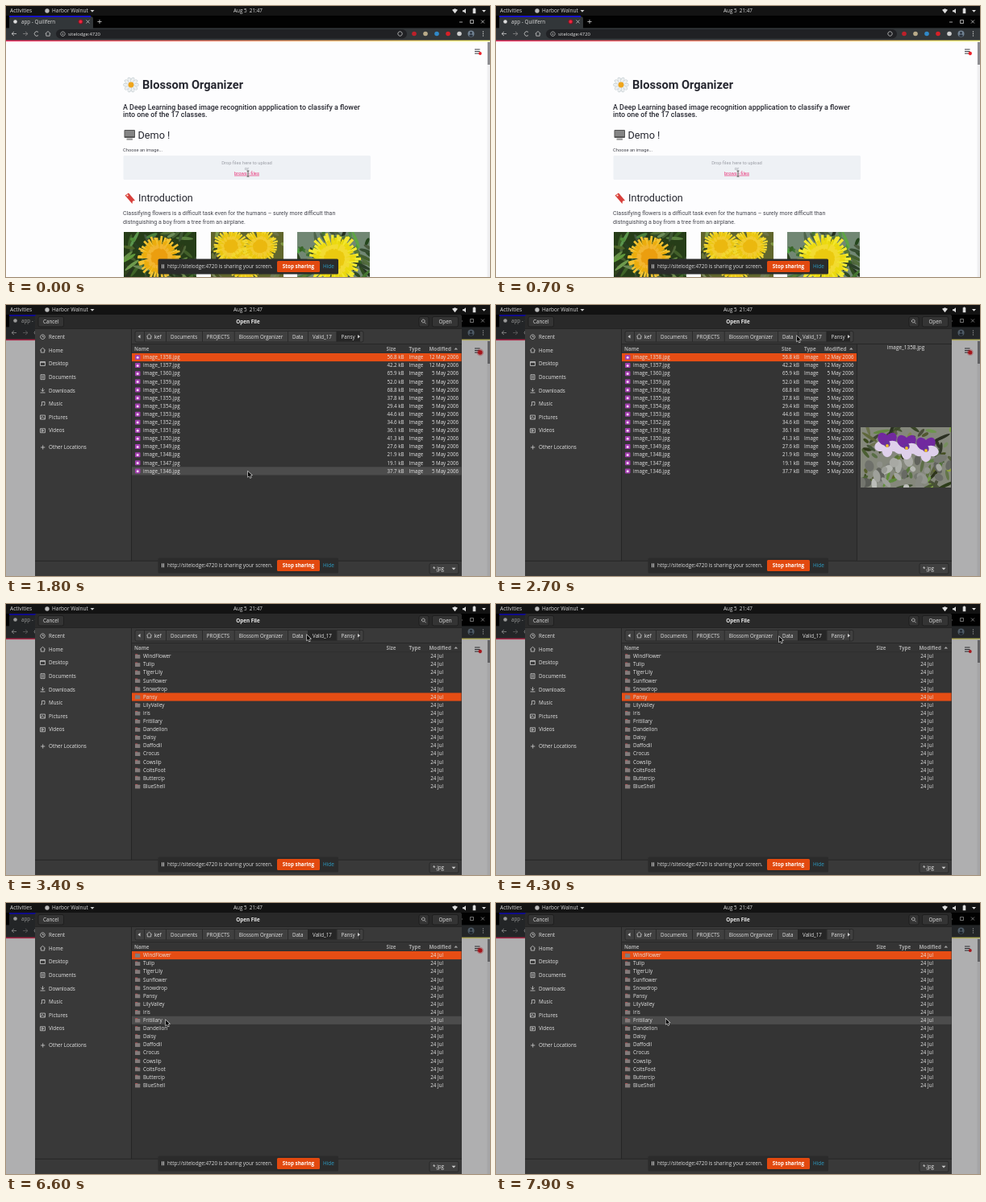
Write an HTML page with a canvas that moves like this. It is 600 by 337 pixels and loops after 8 s.

```html
<!DOCTYPE html>
<html lang="en">
<head>
<meta charset="utf-8">
<title>Flower demo</title>
<style>
html, body { margin: 0; width: 100%; height: 100%; overflow: hidden; background: #000; }
canvas { display: block; }
</style>
</head>
<body>
<canvas id="stage" width="600" height="337"></canvas>
<script>
const g = document.getElementById('stage').getContext('2d');
const LOOP = 8000, STEP = 100, TAU = Math.PI * 2;
const UI = '"Open Sans", sans-serif', PAGE = 'Roboto, sans-serif';
const ADDRESS = 'sitelodge:4720';
const INK = '#e4e4e4', PANEL = '#393939', LIST = '#343434', EDGE = '#222', ORANGE = '#e64d14';

// ---------- helpers ----------
function rect(x, y, w, h, fill) { g.fillStyle = fill; g.fillRect(x, y, w, h); }

function box(x, y, w, h, r, fill, stroke) {
  g.beginPath();
  g.roundRect(x, y, w, h, r);
  g.fillStyle = fill;
  g.fill();
  if (stroke) { g.strokeStyle = stroke; g.lineWidth = 0.7; g.stroke(); }
}

function oval(x, y, rx, ry, tilt, fill) {
  g.beginPath();
  g.ellipse(x, y, rx, ry, tilt, 0, TAU);
  g.fillStyle = fill;
  g.fill();
}
const dot = (x, y, r, fill) => oval(x, y, r, r, 0, fill);

// y is the middle of the capitals
function text(s, x, y, color = INK, size = 6.3, weight = 500, align = 'left', font = UI) {
  g.font = `${weight} ${size}px ${font}`;
  g.textAlign = align;
  g.fillStyle = color;
  g.fillText(s, x, y + size * 0.355);
}
const pageText = (s, x, y, size, color = '#44454d', weight = 400, align = 'left') =>
  text(s, x, y, color, size, weight, align, PAGE);

// Icon paths are centred on 0,0
const ICONS = {
  back: 'M3 0H-3M0-2.5L-3 0L0 2.5',
  forward: 'M-3 0H3M0-2.5L3 0L0 2.5',
  reload: 'M2 2A2.8 2.8 0 1 1 2 -2',
  house: 'M-3.3 0L0-3L3.3 0M-2.2-.6V2.7H2.2V-.6',
  cross: 'M-2-2L2 2M2-2L-2 2',
  plus: 'M-2.6 0H2.6M0-2.6V2.6',
  minus: 'M-2 .5H2',
  square: 'M-2-2H2V2H-2Z',
  ring: 'M2.7 0A2.7 2.7 0 1 1 2.7 -.01',
  clock: 'M2.8 0A2.8 2.8 0 1 1 2.8 -.01M0-1.5V0H1.5',
  screen: 'M-3-2.5H3V2.5H-3ZM-3-1.6H3',
  sheet: 'M-2.5-3H2.5V3H-2.5ZM-1.5-1H1.5M-1.5 1H1.5',
  load: 'M0-3V1M-2-1L0 1L2-1M-3 2.7H3',
  note: 'M-1 2V-2.5H2.5V1.5M-2.5 2H-1M1 1.5H2.5',
  picture: 'M-3-2.5H3V2.5H-3ZM-2.5 2L-.5-1L2.5 2',
  film: 'M-3-2.5H3V2.5H-3ZM-1-1.4L1.5 0L-1 1.4Z',
  lens: 'M1.4-.5A1.9 1.9 0 1 1 1.4-.51M1 1L2.8 2.8',
  beam: 'M-1.5-3.5H1.5M0-3.5V3.5M-1.5 3.5H1.5',
  down: 'M-2.5-1.3H2.5L0 1.5Z',
  up: 'M-2.3 1.2H2.3L0-1.3Z',
  left: 'M-1.5 0L1.5-2.2V2.2Z',
  right: 'M1.5 0L-1.5-2.2V2.2Z',
  wifi: 'M-3.5-1.5L0-3L3.5-1.5L0 3Z',
  sound: 'M-2.5-1H-1L1.5-3V3L-1 1H-2.5Z',
  battery: 'M-1.8-3H-.8V-3.8H.8V-3H1.8V3H-1.8Z',
  tag: 'M-6-3.5L-1.5-6.5L6.5 3L3.5 3.5L3 7Z',
  pointer: 'M0 0V6.7L1.6 5.4L2.9 8L3.9 7.5L2.8 5L4.8 4.7Z'
};

function icon(name, x, y, { stroke, fill, width = 0.8 }) {
  const path = new Path2D(ICONS[name]);
  g.save();
  g.translate(x, y);
  if (stroke) { g.strokeStyle = stroke; g.lineWidth = width; g.stroke(path); }
  if (fill) { g.fillStyle = fill; g.fill(path); }
  g.restore();
}
const outline = (name, x, y, stroke = '#ccc') => icon(name, x, y, { stroke });
const solid = (name, x, y, fill = '#ccc') => icon(name, x, y, { fill });

function random(seed) {
  return () => (seed = (seed * 16807) % 2147483647) / 2147483647;
}

// ---------- pictures ----------
function picture(x, y, w, h, ground, hue, seed, draw) {
  const rnd = random(seed);
  g.save();
  g.beginPath();
  g.rect(x, y, w, h);
  g.clip();
  rect(x, y, w, h, ground);
  for (let i = 0; i < 70; i++) {
    const fill = `hsl(${hue + rnd() * 25} ${15 + rnd() * 30}% ${15 + rnd() * 32}%)`;
    oval(x + rnd() * w, y + rnd() * h, 3 + rnd() * 9, 2, rnd() * 3, fill);
  }
  draw(rnd);
  g.restore();
}

function dandelion(x, y, r, hue, rnd) {
  for (let ring = 0; ring < 4; ring++) {
    g.strokeStyle = `hsl(${hue - ring * 2} 88% ${57 - (ring % 2) * 8}%)`;
    g.lineWidth = r * 0.1;
    g.beginPath();
    for (let i = 0; i < 36; i++) {
      const a = (i + rnd()) / 36 * TAU, l = r * (1 - ring * 0.2) * (0.85 + rnd() * 0.15);
      g.moveTo(x, y);
      g.lineTo(x + Math.cos(a) * l, y + Math.sin(a) * l);
    }
    g.stroke();
  }
}

function pansy(x, y, r) {
  for (let i = 0; i < 5; i++) {
    const a = Math.PI / 2 + (i + 0.001) * TAU / 5, top = Math.sin(a) < -0.5;
    oval(x + Math.cos(a) * r * 0.6, y + Math.sin(a) * r * 0.6, r * 0.65, r * 0.5, a, top ? '#71299f' : '#dfd0eb');
  }
  dot(x, y, r * 0.28, '#68309a');
  dot(x, y + r * 0.15, r * 0.15, '#efc32a');
}

function photos() {
  picture(146, 281, 90, 56, '#263d18', 85, 11, rnd => dandelion(190, 312, 28, 45, rnd));
  picture(254, 281, 90, 56, '#61662d', 60, 29, rnd => {
    for (let i = 0; i < 3; i++) dandelion(279 + i * 18, 299 + (i % 2) * 23, 23, 52, rnd);
  });
  picture(361, 281, 90, 56, '#718773', 90, 47, rnd => dandelion(407, 315, 34, 57, rnd));
}

function preview() {
  picture(452, 152, 112, 75, '#85887c', 70, 19, rnd => {
    for (let i = 0; i < 35; i++) {
      const l = 35 + rnd() * 40;
      oval(452 + rnd() * 112, 190 + rnd() * 37, 3 + rnd() * 6, 3 + rnd() * 3, rnd() * 3, `hsl(80 3% ${l}%)`);
    }
    for (let i = 0; i < 3; i++) pansy(485 + i * 24, 173 + i * 3, 13);
  });
}

// ---------- desktop and browser ----------
function topBar() {
  rect(0, 0, 600, 12, '#131313');
  text('Activities', 5, 6, '#ddd', 6.6);
  dot(51, 6, 2.7, '#bbb');
  text('Harbor Walnut', 57, 6, '#ddd', 6.5);
  solid('down', 107, 6.2);
  text('Aug 5  21:47', 300, 6, '#ddd', 6.3, 500, 'center');
  ['wifi', 'sound', 'battery', 'down'].forEach((name, i) => solid(name, 556.5 + i * 12, 6.2, '#ddd'));
}

function browser() {
  const bar = '#323639';
  rect(0, 12, 600, 15.5, '#020202');
  rect(0, 27.5, 600, 15.5, bar);
  box(4, 13, 104, 15, [3, 3, 0, 0], bar);
  rect(4, 12, 101, 2, '#1712c9');
  dot(11.5, 19.5, 2.3, '#ddd');
  text('app - Quillfern', 19, 19.5, '#ddd');
  dot(92.5, 19.5, 3, '#8d1525');
  dot(92.5, 19.5, 1.9, '#f02640');
  outline('cross', 101.5, 19.5);
  outline('plus', 116, 19.5);
  ['minus', 'square', 'cross'].forEach((name, i) => outline(name, 564 + i * 13.5, 19.5));
  ['back', 'forward', 'reload', 'house'].forEach((name, i) => outline(name, 10 + i * 14, 34.5, i === 1 ? '#888' : '#ccc'));

  box(62, 29, 435, 11.5, 5.7, '#202124');
  outline('ring', 70.5, 34.7, '#bbb');
  rect(70.1, 33.8, 0.8, 2.2, '#bbb');
  text(ADDRESS, 77, 34.7, '#e2e2e2', 5.9);
  outline('ring', 488.5, 34.5);

  ['#bd202a', '#b8aa89', '#3088c8', '#d62027', '#ccc'].forEach((color, i) => dot(506 + i * 14, 34.5, 2.8, color));
  dot(576.5, 34.5, 4, '#718292');
  dot(576.5, 33.4, 1.4, '#29313c');
  oval(576.5, 36.8, 2.4, 1.4, 0, '#29313c');
  for (let i = -1; i <= 1; i++) dot(591.5, 34.5 + i * 2.5, 0.7, '#ccc');
}

function emojis() {
  for (let i = 0; i < 10; i++) {
    const a = i * TAU / 10, x = 155 + Math.cos(a) * 6, y = 98 + Math.sin(a) * 6;
    oval(x, y, 3.6, 2.2, a, '#b6c2c7');
    oval(x, y, 3.2, 1.8, a, '#edf0f1');
  }
  dot(155, 98, 3.4, '#efa51c');
  box(146.5, 154, 13.5, 10, 1, '#555');
  rect(147.5, 155, 11.5, 7, '#858585');
  box(149.5, 164.5, 7.5, 2.2, 0.5, '#999');
  solid('tag', 153.5, 239, '#d8403c');
  dot(150.5, 235.5, 1.1, '#fff1df');
}

function page(t) {
  const dark = '#262730', hint = '#9a9da5', pink = '#e83378';
  rect(0, 43, 600, 294, '#fdfdfe');
  const band = g.createLinearGradient(0, 0, 600, 0);
  band.addColorStop(0, '#f63366');
  band.addColorStop(1, '#fffd80');
  rect(0, 42.6, 600, 1.5, band);

  emojis();
  pageText('Blossom Organizer', 169, 98, 14.6, dark, 700);
  pageText('A Deep Learning based image recognition appplication to classify a flower', 145, 126, 8.9, dark, 500);
  pageText('into one of the 17 classes.', 145, 134.5, 8.9, dark, 500);
  pageText('Demo !', 163.5, 160.3, 12.7, dark);
  pageText('Choose an image...', 145, 179, 5.75);
  box(145.5, 186, 306.5, 30, 1.5, '#eef1f5');
  pageText('Drop files here to upload', 298.5, 195, 5.8, hint, 400, 'center');
  pageText('or', 298.5, 201.5, 5.8, hint, 400, 'center');
  pageText('browse files', 298.5, 208, 5.75, pink, 400, 'center');
  rect(283, 210.6, 31, 0.7, pink);
  pageText('Introduction', 164, 239, 12.6, dark);
  pageText('Classifying flowers is a difficult task even for the humans – surely more difficult than', 145, 257.2, 7.05);
  pageText('distnguishing a boy from a tree from an airplane.', 145, 268, 7.05);
  photos();

  rect(596.5, 44, 3.5, 293, '#efeff1');
  rect(597, 45, 3, 28, '#8d8d91');
  for (let i = 0; i < 3; i++) rect(581, 53.5 + i * 2.5, 6.5, 1, '#3c3c43');
  const pulse = 0.5 - 0.5 * Math.cos(t / 4100 * TAU);
  dot(587.8, 59, 2.2 + pulse * 2.3, `rgba(250, 40, 50, ${0.35 * pulse})`);
  dot(587.8, 59, 1.9 + pulse * 0.9, '#ee2029');
}

function shareBar() {
  box(188.5, 314.5, 223.5, 19, 1.5, '#2b2b2b');
  for (let i = 0; i < 2; i++) rect(193 + i * 2, 321.3, 1, 5, '#ccc');
  text('http://' + ADDRESS + ' is sharing your screen.', 200, 324, '#dcdcdc', 6.4);
  box(336, 317, 53, 14, 1.5, '#e2490f');
  text('Stop sharing', 362.5, 324, '#fff', 6.3, 700, 'center');
  text('Hide', 393, 324, '#2d9ec6', 6.4);
}

// ---------- file dialog ----------
const CRUMBS = ['kef', 'Documents', 'PROJECTS', 'Blossom Organizer', 'Data', 'Valid_17', 'Pansy'];
const PLACES = { Recent: 'clock', Home: 'house', Desktop: 'screen', Documents: 'sheet',
  Downloads: 'load', Music: 'note', Pictures: 'picture', Videos: 'film' };
const KINDS = ('WindFlower Tulip TigerLily Sunflower Snowdrop Pansy LilyValley iris Fritillary ' +
  'Dandelion Daisy Daffodil Crocus Cowslip ColtsFoot Buttercip BlueShell').split(' ');
const SIZES = '56.8 42.2 65.9 52.0 68.8 37.8 29.4 44.6 34.6 36.1 41.3 27.6 21.9 19.1 37.7'.split(' ');

// Files 1360 down to 1346, with the two edited last moved to the top
const FILES = SIZES.map((kb, i) => ({
  name: `image_${1360 - (i < 4 ? (i + 2) % 4 : i)}.jpg`,
  size: kb + ' kB',
  date: (i < 2 ? '12' : '5') + ' May 2006'
}));
const folders = names => names.map(name => ({ name, date: '24 Jul' }));

const VIEWS = [
  { from: 1700, crumb: 'Pansy', rows: FILES, selected: 0 },
  { from: 3100, crumb: 'Valid_17', rows: folders(KINDS), selected: 5 },
  { from: 4400, crumb: 'Data', rows: folders(['Valid_17', 'Train_17']), selected: 0 },
  { from: 6000, crumb: 'Valid_17', rows: folders(KINDS), selected: 0 }
];

function button(x, w, label = '') {
  box(x, 14.5, w, 12.5, 2, LIST, '#191919');
  text(label, x + w / 2, 20.7, INK, 6.3, 500, 'center');
}

function crumbBar(current) {
  box(160, 32.5, 283, 13.5, 2, '#404040', EDGE);
  let x = 171;
  g.font = `500 6.2px ${UI}`;
  for (const name of CRUMBS) {
    const lead = name === 'kef' ? 7 : 0;
    const w = g.measureText(name).width + 11.6 + lead;
    if (name === current) rect(x, 33, w, 12.5, '#262626');
    rect(x, 33, 0.7, 12.5, EDGE);
    text(name, x + (w + lead) / 2, 39.3, INK, 6.2, 500, 'center');
    x += w;
  }
  rect(x, 33, 0.7, 12.5, EDGE);
  solid('left', 165, 39.2);
  solid('right', 437.5, 39.2);
  outline('house', 177.5, 39.2);
}

function dialogFrame(crumb) {
  box(36, 12, 529, 326, [3, 3, 0, 0], LIST);
  box(36, 12, 529, 17.5, [3, 3, 0, 0], '#292929');
  rect(36, 29, 529, 0.8, EDGE);
  button(40, 31.5, 'Cancel');
  text('Open File', 300, 20.7, '#eee', 6.3, 700, 'center');
  button(512, 12);
  outline('lens', 517.8, 20.5);
  button(528.5, 32, 'Open');

  rect(36, 30, 119, 288, PANEL);
  rect(155, 30, 0.8, 288, EDGE);
  Object.entries(PLACES).forEach(([name, mark], i) => {
    const y = 39.7 + i * 16.65;
    outline(mark, 45.5, y);
    text(name, 53, y);
  });
  outline('plus', 45.7, 177);
  text('Other Locations', 53, 177);

  rect(156, 30, 409, 18.5, PANEL);
  crumbBar(crumb);
  rect(156, 48.3, 409, 0.7, EDGE);
  rect(36, 318, 529, 19, PANEL);
  rect(36, 317.8, 529, 0.8, EDGE);
  box(525, 321.3, 36, 13, 2, '#404040', EDGE);
  text('*.jpg', 529, 327.8);
  solid('down', 555, 328);
}

function rowIcon(isFile, y) {
  if (isFile) {
    box(160, y - 3, 6.5, 6, 0.8, '#a23fae');
    dot(163.2, y + 0.3, 1.5, '#f3d7f4');
  } else {
    box(160, y - 2.7, 3.3, 2, 0.5, '#b44f50');
    box(160, y - 1.9, 6.3, 4.7, 0.5, '#837b7b');
  }
}

function fileList(view, narrow, pointer) {
  const shift = narrow ? 0 : 117.5, width = 291 + shift;
  const heading = (s, x, align) => text(s, x + shift, 54.3, '#a9a9a9', 6.2, 700, align);
  const cell = (s, x, y, align) => text(s, x + shift, y, INK, 6.2, 500, align);
  text('Name', 159, 54.3, '#a9a9a9', 6.2, 700);
  heading('Size', 366, 'right');
  heading('Type', 382);
  heading('Modified', 407);
  solid('up', 440.3 + shift, 54.3, '#a9a9a9');
  rect(156, 59.3, width, 0.5, '#2b2b2b');

  const hovered = pointer.x > 156 ? Math.floor((pointer.y - 60) / 10.1) : -1;
  view.rows.forEach((row, i) => {
    const y = 65 + i * 10.1;
    if (i === view.selected) rect(156, y - 5, width, 10.1, ORANGE);
    else if (i === hovered) rect(156, y - 5, width, 10.1, '#4c4c4c');
    rowIcon(row.size, y);
    text(row.name, 170, y);
    if (row.size) {
      cell(row.size, 376, y, 'right');
      cell('Image', 382, y);
      cell(row.date, 443.5, y, 'right');
    } else cell(row.date, 424.5, y, 'right');
  });

  if (narrow) {
    rect(447, 49, 118, 268.8, PANEL);
    rect(447, 49, 0.7, 268.8, EDGE);
    text(view.rows[0].name, 508, 52.5, INK, 6.4, 500, 'center');
    preview();
  }
}

// ---------- pointer ----------
const LINK = { x: 300, y: 207 };
const MOVES = [
  { start: 1900, end: 2600, x: 373, y: 38.5 },
  { start: 3600, end: 4200, x: 351, y: 40.5 },
  { start: 4500, end: 5400, x: 217, y: 62.5, bend: 20 },
  { start: 6100, end: 6600, x: 198, y: 145.5 },
  { start: 7000, end: 7700, x: 210.5, y: 144 }
];

function pointerAt(t) {
  let { x, y } = LINK;
  for (const m of MOVES) {
    const u = Math.min(1, Math.max(0, (t - m.start) / (m.end - m.start)));
    const e = u * u * (3 - 2 * u);
    x += (m.x - x) * e;
    y += (m.y - y) * e + (m.bend || 0) * Math.sin(Math.PI * e);
  }
  return { x, y };
}

function drawPointer(t, { x, y }) {
  if (t < 900) {
    icon('beam', x, y + 1.5, { stroke: '#fff', width: 1.8 });
    outline('beam', x, y + 1.5, '#222');
  } else icon('pointer', x, y, { stroke: '#eee', width: 1.1, fill: '#080808' });
}

// ---------- timeline ----------
function draw(t) {
  const pointer = pointerAt(t);
  const view = VIEWS.filter(v => t >= v.from).pop();
  browser();
  page(t);
  if (view) {
    rect(0, 12, 600, 325, 'rgba(0, 0, 0, 0.31)');
    dialogFrame(view.crumb);
    fileList(view, view.crumb === 'Pansy' && t >= 1900, pointer);
  }
  topBar();
  shareBar();
  drawPointer(t, pointer);
}

const start = performance.now();
function tick() {
  const t = (performance.now() - start) % LOOP;
  draw(Math.floor(t / STEP) * STEP);
  requestAnimationFrame(tick);
}
tick();
</script>
</body>
</html>
```
